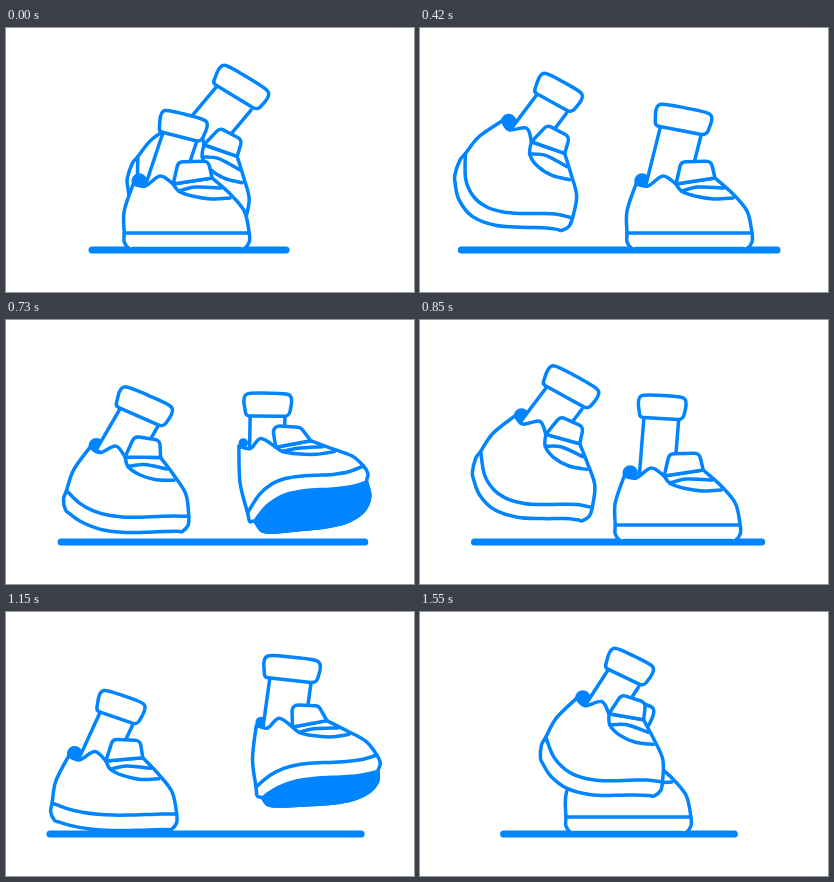
An HTML page with a canvas that plays this animation: 408 px wide and 264 px high, repeating every 1.58 s.

```html
<!DOCTYPE html>
<html lang="en">
<head>
<meta charset="utf-8">
<title>Walking shoes</title>
<style>
html, body { margin: 0; width: 100%; height: 100%; overflow: hidden; background: #fff; }
canvas { display: block; width: 408px; height: 264px; }
</style>
</head>
<body>
<canvas id="stage"></canvas>
<script>
const W = 408, H = 264, LOOP = 1580, CYCLE = 1012, HALF = 517;
const BLUE = '#0084ff', WHITE = '#fff', RAD = Math.PI / 180;
const FAR = { lag: 0, dx: 0, cuff: 56 }, NEAR = { lag: HALF, dx: -38.5, cuff: 47 };

const canvas = document.getElementById('stage');
const ctx = canvas.getContext('2d');
const dpr = window.devicePixelRatio || 1;
canvas.width = W * dpr;
canvas.height = H * dpr;

// The shoe at rest, measured from the front end of the sole line
const LENGTH = 125, SOLE = 15.5;
const SHOE = {
  rear: [-125, -22], heel: [-116, -49], dip: [-104, -47], crest: [-89, -57],
  throat: [-76, -49], vamp: [-37, -55], lace: [-20, -40], toe: [-5, -22],
  tongueL: [-71, -71], tongueR: [-41, -72], corner: [-57, -37],
  lining: [-110, -52], ankle: [-83, -55]
};

// One stride: time, toe x and y, pitch of the shoe, lean and length of the leg
const STRIDE = [
  [0, 239, 193, 31, 40, 51],
  [43, 281, 170, 21, 33, 34],
  [180, 391, 139, -22, 2, 43],
  [235, 396, 146, -22, 1, 25],
  [288, 382, 205, 0, -3, 53],
  [420, 332, 205, 0, 14, 49],
  [530, 275, 205, 0, 19, 43],
  [697, 193, 200, 8, 27, 39],
  [805, 169, 187, 23, 37, 36],
  [937, 191, 190, 31, 37, 38]
];

// Periodic monotone cubic interpolation
function sample(keys, time) {
  const n = keys.length, t = time % CYCLE;
  const at = i => {
    const k = Math.floor(i / n), [t0, ...v] = keys[i - k * n];
    return { t: t0 + k * CYCLE, v };
  };
  let i = n - 1;
  while (keys[i][0] > t) i--;
  const [a, b, c, d] = [at(i - 1), at(i), at(i + 1), at(i + 2)];
  const h = c.t - b.t, u = (t - b.t) / h;
  const slope = (p, q) => p * q <= 0 ? 0 : 2 * p * q / (p + q);
  return b.v.map((p, j) => {
    const q = c.v[j], s = (q - p) / h;
    const m0 = slope((p - a.v[j]) / (b.t - a.t), s) * h;
    const m1 = slope(s, (d.v[j] - q) / (d.t - c.t)) * h;
    return p + u * (m0 + u * (3 * (q - p) - 2 * m0 - m1 + u * (2 * (p - q) + m0 + m1)));
  });
}

// Bends the resting shoe: the heel curls more than the toe, the sole bulges with the pitch
function bender(x0, y0, pitch, raised) {
  const curl = 16 * Math.tanh(Math.abs(pitch) / 8), tilt = pitch - curl / 2;
  return ([x, y]) => {
    const u = -x / LENGTH;
    const along = (tilt + curl * u / 2) * RAD, turn = (tilt + curl * u) * RAD;
    const bulge = pitch * 6.75 * u * u * (1 - u) * Math.min(1, Math.max(0, 1 + y / 50));
    const rise = y < 0 ? y * (1 + 0.8 * raised * (u - 0.48)) : y;
    return [
      x0 + x * Math.cos(along) - (rise + bulge) * Math.sin(turn),
      y0 + x * Math.sin(along) + (rise + bulge) * Math.cos(turn)
    ];
  };
}

const mix = (a, b, k) => [a[0] + (b[0] - a[0]) * k, a[1] + (b[1] - a[1]) * k];

// Smooth curve through points, continuing the current path
function curve(...p) {
  ctx.lineTo(...p[0]);
  for (let i = 0; i < p.length - 1; i++) {
    const b = p[i], c = p[i + 1], a = p[i - 1] || b, d = p[i + 2] || c;
    ctx.bezierCurveTo(b[0] + (c[0] - a[0]) / 6, b[1] + (c[1] - a[1]) / 6,
      c[0] - (d[0] - b[0]) / 6, c[1] - (d[1] - b[1]) / 6, c[0], c[1]);
  }
}

function draw(path, fill, line = true) {
  ctx.beginPath();
  path();
  if (fill) { ctx.fillStyle = fill; ctx.fill(); }
  if (line) ctx.stroke();
}

function leg([x, y], lean, length, width) {
  const half = width * 0.37, w = width / 2, h = 22;
  ctx.save();
  ctx.translate(x, y);
  ctx.rotate(lean * RAD);
  draw(() => ctx.rect(-half, -length, half * 2, length + 11), WHITE, false);
  for (const side of [-half, half]) {
    draw(() => { ctx.moveTo(side, 11); ctx.lineTo(side, -length); });
  }
  ctx.translate(0, -length);
  ctx.rotate(-lean * 0.22 * RAD);
  draw(() => {
    ctx.moveTo(-w, -h / 2);
    ctx.bezierCurveTo(-w - 2, -h - 2, -w + 2, -h - 1, 0, -h - 1);
    ctx.bezierCurveTo(w - 2, -h - 1, w + 2, -h - 2, w, -h / 2);
    ctx.arcTo(w - 2, 0, 0, 0, 6);
    ctx.arcTo(-w + 2, 0, -w, -h / 2, 4);
    ctx.closePath();
  }, WHITE);
  ctx.restore();
}

function foot(t, width) {
  const [x, y, pitch, lean, length] = sample(STRIDE, t);
  const raised = Math.max(0, -pitch / 22);
  const bend = bender(x, y, pitch, raised);
  const p = {};
  for (const name in SHOE) p[name] = bend(SHOE[name]);

  // Row of points from toe to heel at the bottom of the sole
  const row = depth => Array.from({ length: 9 }, (_, i) => {
    const a = Math.PI * i / 8, u = 0.5 - 0.46 * Math.cos(a);
    return bend([-LENGTH * u, SOLE + depth * Math.sin(a)]);
  });
  const edge = row(0), under = row(40 * raised);
  const seam = Array.from({ length: 9 }, (_, i) => bend([-LENGTH * i / 8, 0]));

  draw(() => ctx.arc(...p.lining, 6 - 3 * raised, 0, Math.PI * 2), BLUE);
  leg(p.ankle, lean, length, width);

  draw(() => {
    curve(p.heel, p.dip, p.crest, p.throat);
    curve(p.vamp, p.lace, p.toe, seam[0], bend([0, 9]), ...under,
      bend([-LENGTH, 9]), seam[8], p.rear, p.heel);
  }, WHITE);
  if (raised) {
    draw(() => { curve(...edge); curve(...under.reverse()); }, BLUE);
  }
  draw(() => curve(...seam));

  // Laces
  const flap = mix(p.throat, bend([-69, -40]), 0.8);
  draw(() => curve(p.throat, flap, p.corner, bend([-38, -34]), bend([-19, -35])));
  draw(() => curve(flap, bend([-54, -46]), bend([-28, -45])));

  draw(() => {
    ctx.moveTo(...p.throat);
    ctx.arcTo(...p.tongueL, ...p.tongueR, 6);
    ctx.arcTo(...p.tongueR, ...p.vamp, 6);
    ctx.lineTo(...p.vamp);
    ctx.closePath();
  }, WHITE);
}

// The ground stretches with every step, more with the far foot in front
function ground(t) {
  const phase = t % CYCLE, far = phase < HALF;
  const u = far ? phase / HALF : (phase - HALF) / (CYCLE - HALF);
  const left = 86 - (far ? 70 : 34) * Math.sin(Math.PI * u ** 1.2);
  const right = 280 + 26 * Math.sin(Math.PI * phase / CYCLE) ** 2
    + (far ? 95 : 65) * Math.sin(Math.PI * u);
  ctx.lineWidth = 7;
  draw(() => { ctx.moveTo(left, 222); ctx.lineTo(right, 222); });
}

function frame(now) {
  const t = now % LOOP;
  ctx.setTransform(dpr, 0, 0, dpr, 0, 0);
  ctx.fillStyle = WHITE;
  ctx.fillRect(0, 0, W, H);
  ctx.strokeStyle = BLUE;
  ctx.lineCap = ctx.lineJoin = 'round';
  ground(t);
  ctx.lineWidth = 3.5;
  for (const side of [FAR, NEAR]) {
    ctx.save();
    ctx.translate(side.dx, 0);
    foot(t + side.lag, side.cuff);
    ctx.restore();
  }
}

let start;
function tick(now) {
  start ??= now;
  frame(now - start);
  requestAnimationFrame(tick);
}
frame(0);
requestAnimationFrame(tick);
</script>
</body>
</html>
```
